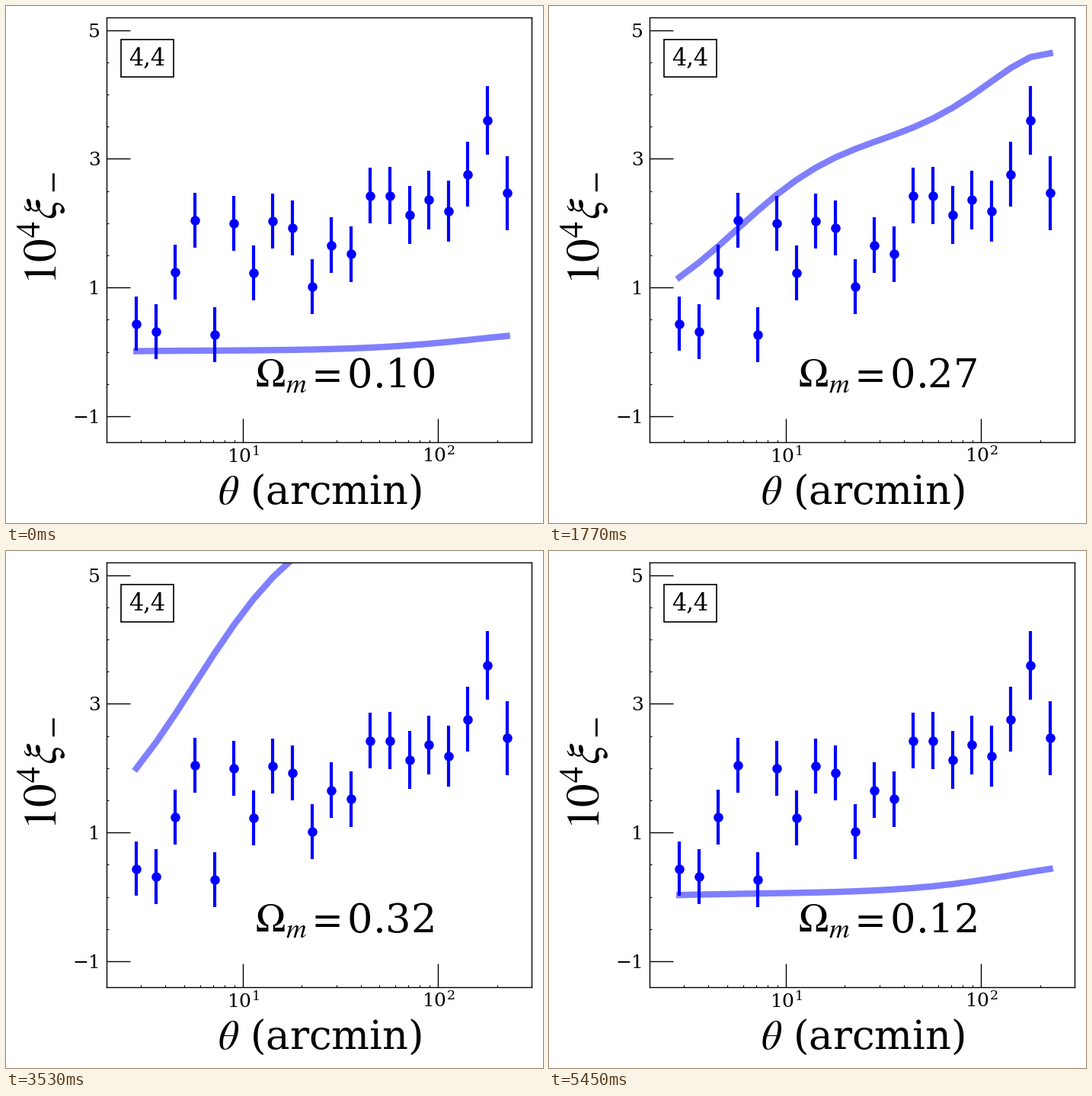
Recreate the animation shown at these times as a matplotlib script. Size 705 by 678 pixels, loop 5610 ms.

```python
import numpy as np
import matplotlib.pyplot as plt
from matplotlib.animation import FuncAnimation
from matplotlib.patches import Rectangle
from matplotlib.ticker import AutoMinorLocator, NullFormatter

W, H = 705, 678
LOOP, TICK = 5610, 30          # ms
HOLD, STEP, PEAK = 330, 160, 17

plt.rcParams.update({
    "font.family": "DejaVu Serif",
    "mathtext.fontset": "stix",
    "axes.linewidth": 1.0,
})

bins = np.arange(20)
theta = 2.833 * 10 ** (0.1 * bins)

# measured correlation, with errors that grow at wide angles
xi = [0.44, 0.32, 1.24, 2.05, 0.27, 2.00, 1.23, 2.03, 1.93, 1.01,
      1.66, 1.52, 2.43, 2.43, 2.13, 2.36, 2.19, 2.76, 3.60, 2.47]
err = 0.425 + 0.148 * (bins / 19) ** 6


def smooth(*values):
    """Polynomial through six key bins, evaluated at every bin."""
    return np.polyval(np.polyfit([0, 4, 8, 12, 16, 19], values, 5), bins)


# log model: level at density 0.2034, then slope and bend in log density
level = smooth(-0.931, -0.305, 0.021, 0.253, 0.609, 0.830)
slope = smooth(4.042, 4.091, 4.049, 3.631, 3.019, 2.622)
bend = smooth(-1.20, -1.25, -1.15, -0.75, -0.65, -0.72)


def omega(k):
    return 0.1 + 0.5 / 29 * k


def model(om):
    z = np.log(om / 0.2034)
    return np.exp(level + slope * z + bend * z ** 2)


fig = plt.figure(figsize=(W / 100, H / 100), dpi=100, facecolor="white")
ax = fig.add_axes([132.4 / W, 1 - 571.8 / H, 557.2 / W, 557 / H])
ax.set_xscale("log")
ax.set(xlim=(2, 300), ylim=(-1.4, 5.2), yticks=[-1, 1, 3, 5])
ax.yaxis.set_minor_locator(AutoMinorLocator(4))
ax.xaxis.set_minor_formatter(NullFormatter())
ax.tick_params(which="major", direction="in", length=22.5, width=1, labelsize=18)
ax.tick_params(which="minor", direction="in", length=2.5, width=0.8)
ax.tick_params(axis="y", which="major", pad=6)
ax.tick_params(axis="x", which="major", pad=4)


def label(x, y, text, size, **kw):
    return fig.text(x / W, 1 - y / H, text, size=size, va="baseline", **kw)


line, = ax.plot(theta, model(omega(0)), color="blue", alpha=0.5, lw=6)
ax.errorbar(theta, xi, yerr=err, fmt="o", color="blue", ms=8, elinewidth=3)

fig.add_artist(Rectangle((151 / W, 1 - 93 / H), 68.5 / W, 49 / H,
                         fc="white", ec="black", lw=1.2))
label(185.5, 77.5, "4,4", 22, ha="center")
label(412, 653, r"$\theta$ (arcmin)", 38, ha="center")
label(67.5, 292, r"$10^4\xi_-$", 44, ha="center",
      rotation=90, rotation_mode="anchor")
value = label(327, 500, "", 38)


def draw(n):
    t = (n + 1) * TICK - 1
    k = 0 if t < HOLD else 1 + (t - HOLD) // STEP
    om = omega(PEAK - abs(PEAK - k))
    line.set_ydata(model(om))
    value.set_text(rf"$\Omega_m=${om:.2f}")
    return line, value


anim = FuncAnimation(fig, draw, frames=LOOP // TICK, interval=TICK,
                     repeat=True, repeat_delay=0)
plt.show()
```
